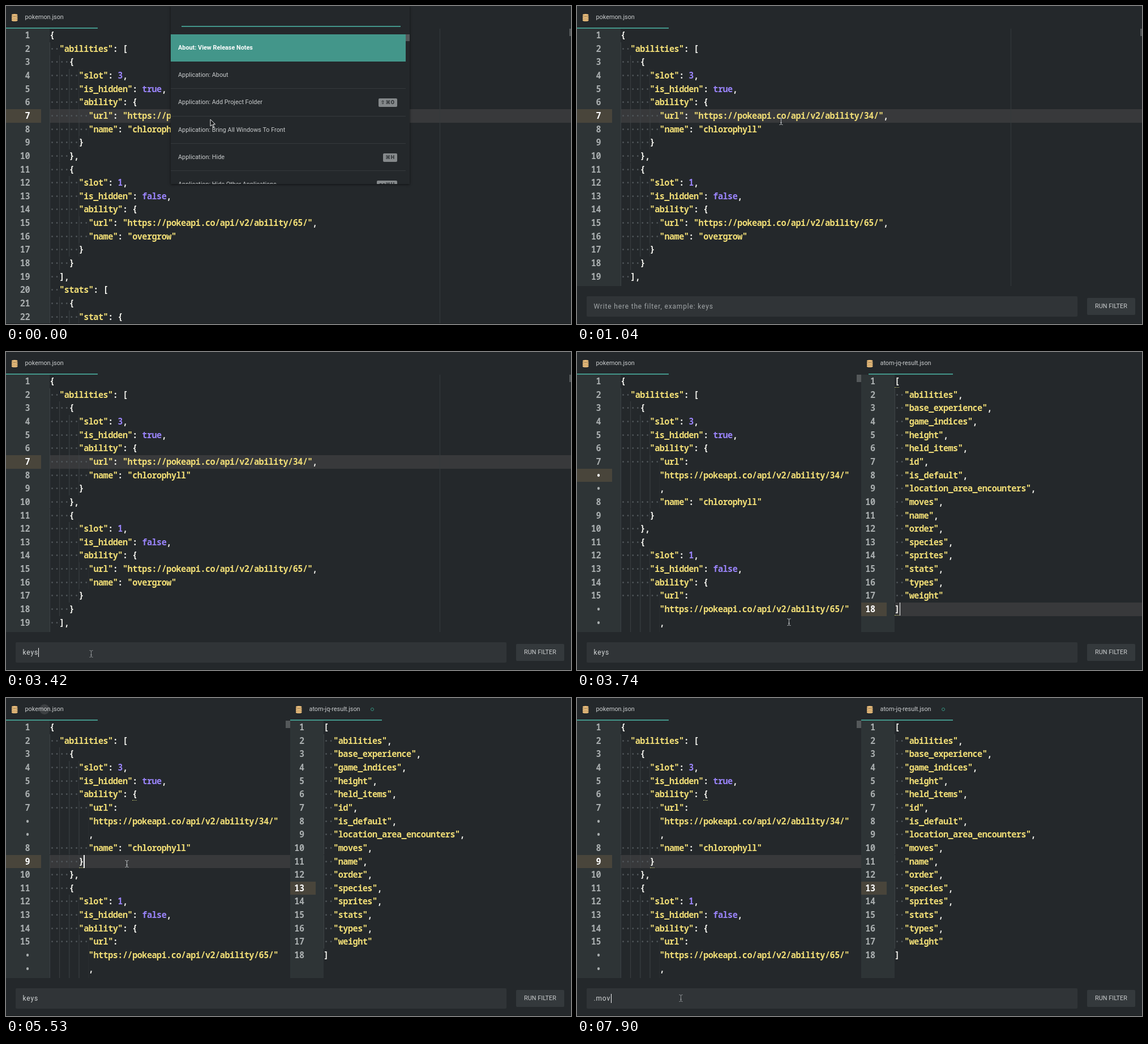
These frames come from a looping animation (998 px wide and 561 px high, 8 s). An HTML page:

```html
<!DOCTYPE html>
<html lang="en">
<head>
<meta charset="utf-8">
<title>JSON filter</title>
<style>
:root { --bg: #24282b; --teal: #43968a; --pitch: 8.6px; --row: 23.65px; }
html, body { margin: 0; width: 100%; height: 100%; overflow: hidden; background: var(--bg); }
#stage { position: relative; width: 998px; height: 561px; overflow: hidden; background: var(--bg);
  font: 10.85px Roboto, sans-serif; color: #c9cccd; }
#stage div, #stage svg { position: absolute; }
[hidden] { display: none !important; }
.pane { top: 0; height: 561px; overflow: hidden; background: var(--bg);
  font: 600 15.2px/var(--row) "Noto Sans Mono", monospace; letter-spacing: -.52px; white-space: pre; }
.gutter { left: 0; top: 40px; height: 521px; background: #2e3436; }
.num { left: 0; text-align: right; color: #a9aeaf; height: var(--row); }
.num.current { color: #fff; }
.line { height: var(--row); color: #f4f4ef; }
.line i { display: inline-block; vertical-align: top; height: var(--row); color: #50565a; font-style: normal;
  background: linear-gradient(90deg, #3d4346 1px, transparent 1px) 0 0 / calc(2 * var(--pitch)) 100%; }
.line b { font-weight: 600; color: #f0dd76; }
.line em { font-style: normal; color: #9a84fb; }
.rowmark { height: var(--row); right: 0; background: #38393b; }
.nummark { height: var(--row); left: 0; background: #49453b; }
.match { height: 0; width: 8px; border-bottom: 1px dotted #b9bd6e; }
.caret { width: 1.4px; height: 23px; background: #f4f4f4; }
.thumb { background: #54585a; }
.tab { top: 0; height: 40px; line-height: 40px; width: 162px; }
.tab .name { left: 33.5px; white-space: nowrap; }
.tab .bar { left: 0; right: 0; top: 38px; height: 1.6px; background: var(--teal); }
#palette { left: 291px; top: 0; width: 422px; height: 314px; overflow: hidden; background: var(--bg);
  box-shadow: 0 1px 4px #0009; }
.item { left: 0; width: 415px; height: 47.2px; line-height: 48px; border-bottom: 1px solid #35393c;
  text-indent: 13px; white-space: nowrap; }
.item.first { background: var(--teal); color: #fff; font-weight: 700; border-color: var(--teal); }
.key { right: 15px; top: 17px; height: 15px; line-height: 15px; padding: 0 4px; border-radius: 2px; text-indent: 0;
  background: #85898b; color: #24282b; font: 700 9px/15px Roboto, "DejaVu Sans", sans-serif; letter-spacing: 1px; }
#panel { left: 0; top: 494px; width: 998px; height: 67px; background: var(--bg); }
#input { left: 17px; top: 18px; width: 867px; height: 36px; border-radius: 2px; background: #303437; }
#text { left: 12.5px; line-height: 36px; font-size: 12px; letter-spacing: .83px; white-space: pre; color: #d3d6d7; }
#text.empty { color: #a0a5a7; }
#run { left: 901px; top: 21px; width: 85px; height: 30px; line-height: 30px; text-align: center;
  border-radius: 2px; background: #34393c; }
</style>
</head>
<body>
<div id="stage"></div>
<script>
const PITCH = 8.6, ROW = 23.65, TOP = 40, LOOP = 8000;
const stage = document.getElementById('stage');

function add(parent, cls, style = {}, html = '') {
  const el = document.createElement('div');
  el.className = cls;
  for (const [k, v] of Object.entries(style)) el.style[k] = typeof v === 'number' ? v + 'px' : v;
  el.innerHTML = html;
  parent.append(el);
  return el;
}
const show = (el, on) => { el.hidden = !on; };
const rowTop = i => TOP + i * ROW;

const ability = (slot, hidden, id, name, end) => `    {
      "slot": ${slot},
      "is_hidden": ${hidden},
      "ability": {
        "url": "https://pokeapi.co/api/v2/ability/${id}/",
        "name": "${name}"
      }
    }${end}`;
const source = `{
  "abilities": [
${ability(3, true, 34, 'chlorophyll', ',')}
${ability(1, false, 65, 'overgrow', '')}
  ],
  "stats": [
    {
      "stat": {`.split('\n');
const keys = ('abilities base_experience game_indices height held_items id is_default location_area_encounters ' +
  'moves name order species sprites stats types weight').split(' ');
const result = ['[', ...keys.map((k, i) => `  "${k}"${i < keys.length - 1 ? ',' : ''}`), ']'];

const numbered = lines => lines.map((text, i) => ({ num: i + 1, text }));
// Soft wrap: long url lines continue on bulleted rows.
const wrapped = lines => numbered(lines).flatMap(row => {
  const m = row.text.match(/^( +)("url":) (".*")(,)$/);
  if (!m) return [row];
  return [{ num: row.num, text: m[1] + m[2] }, ...[m[3], m[4]].map(s => ({ num: '•', text: m[1] + s, soft: true }))];
});

function paint({ text, soft }) {
  const indent = text.search(/\S/);
  const code = text.trim().replace(/"[^"]*"|true|false|\d+/g, s => s[0] === '"' ? `<b>${s}</b>` : `<em>${s}</em>`);
  return `<i style="width:${indent * PITCH}px">${(soft ? ' ' : '·').repeat(indent)}</i>${code}`;
}

function makePane(left, width, gutter, numRight, markWidth, rows) {
  const el = add(stage, 'pane', { left, width });
  add(el, 'gutter', { width: gutter });
  const rowMark = add(el, 'rowmark', { left: gutter + 1 });
  const numMark = add(el, 'nummark', { width: markWidth });
  const nums = rows.map((row, i) => {
    add(el, 'line', { left: gutter, top: rowTop(i) }, paint(row));
    return add(el, 'num', { top: rowTop(i), width: numRight }, row.num);
  });
  const at = (row, col) => ({ left: gutter + col * PITCH, top: rowTop(row) });
  return {
    el,
    select(row, active) {
      rowMark.style.top = numMark.style.top = rowTop(row) + 'px';
      show(rowMark, active);
      nums.forEach((n, i) => n.classList.toggle('current', i === row));
    },
    caret: (row, col) => add(el, 'caret', at(row, col)),
    match(row, col) {
      const { left, top } = at(row, col);
      return add(el, 'match', { left, top: top + 22 });
    }
  };
}

const wide = makePane(0, 998, 77, 42, 62, numbered(source));
add(wide.el, '', { left: 766, top: 40, width: 1, height: 521, background: '#34393c' });
add(wide.el, 'thumb', { left: 995, top: 40, width: 3, height: 13 });
wide.select(6, true);
const wideCaret = wide.caret(6, 33);

const left = makePane(0, 502, 77, 42, 62, wrapped(source).slice(0, 20));
add(left.el, 'thumb', { left: 494, top: 40, width: 8, height: 13 });
const leftCaret = left.caret(10, 7);
const leftMatches = [left.match(5, 17), left.match(10, 6)];

const right = makePane(502, 496, 59, 24.5, 45, numbered(result));
const endCaret = right.caret(17, 1), clickCaret = right.caret(12, 9);
const rightMatches = [right.match(0, 0), right.match(17, 0)];

const disc = y => `<path d="M0 ${y}v2.2c0 2.3 10.4 2.3 10.4 0v-2.2c-1 1.6-9.4 1.6-10.4 0z"/>`;
const icon = `<svg width="11" height="13" style="left:10px;top:13.5px" fill="#efc07c">
  <ellipse cx="5.2" cy="1.9" rx="5.2" ry="1.9"/>${disc(3.2)}${disc(6.2)}${disc(9.2)}</svg>`;
const makeTab = (x, name) => add(stage, 'tab', { left: x },
  `${icon}<div class="name">${name}</div><div class="bar"></div>`);
const mainTab = makeTab(0, 'pokemon.json');
const resultTab = makeTab(502, 'atom-jq-result.json');
const resultBar = resultTab.querySelector('.bar');
const ripple = add(mainTab, '', { left: 59, top: 11, width: 18, height: 18, borderRadius: '50%', background: '#ffffff1c' });
const dot = add(resultTab, '', { left: 142, top: 16.5, width: 4, height: 4, borderRadius: '50%', border: '1.5px solid #36917f' });

const panel = add(stage, '');
panel.id = 'panel';
panel.innerHTML = '<div id="input"><div id="text"></div></div><div id="run">RUN FILTER</div>';
const field = document.getElementById('text');
const fieldCaret = add(panel, 'caret', { top: 27.5, height: 16 });

const palette = add(stage, '');
palette.id = 'palette';
add(palette, '', { left: 19, top: 35, width: 387, height: 1.5, background: 'var(--teal)' });
add(palette, 'thumb', { left: 415, top: 50, width: 7, height: 12 });
[['About: View Release Notes'], ['Application: About'], ['Application: Add Project Folder', '⇧⌘O'],
 ['Application: Bring All Windows To Front'], ['Application: Hide', '⌘H'],
 ['Application: Hide Other Applications', '⌥⌘H']].forEach(([label, key], i) =>
  add(palette, i ? 'item' : 'item first', { top: 50 + i * 48.2 }, label + (key ? `<div class="key">${key}</div>` : '')));

add(stage, '', { left: 0, top: 560, width: 998, height: 1, background: '#1b1e20' });

const arrow = add(stage, '', { left: 360, top: 199 }, `<svg width="11" height="17"><path
  d="M1 1v12l2.8-2.6 2 4.6 1.9-.8-2-4.5h3.8z" fill="#17191b" stroke="#eee" stroke-width="1"/></svg>`);
const beam = add(stage, '', {}, `<svg width="9" height="15" style="left:-4.5px;top:-7.5px"><path
  d="M1.5 1.5q3 0 3 2v8q0 2-3 2M7.5 1.5q-3 0-3 2v8q0 2 3 2M3 9.5h3" fill="none" stroke="#b9bdbf"/></svg>`);

// [time, x, y]
const beamPath = [[0, 360, 203], [1190, 345, 225], [1340, 300, 300], [1490, 235, 395], [1640, 175, 480],
  [1780, 135, 525], [1930, 119, 538], [3420, 150, 532], [3590, 260, 510], [3740, 374, 476], [3880, 480, 435],
  [4040, 580, 385], [4200, 640, 347], [5240, 470, 325], [5380, 213, 292], [5680, 212, 310], [5830, 205, 400],
  [5980, 190, 490], [6120, 183, 529]];
// [time, text]
const typing = [[0, ''], [2520, 'k'], [2670, 'key'], [2820, 'keys'], [6720, ''], [7470, '.'], [7610, '.m'],
  [7760, '.mo'], [7900, '.mov']];
const latest = (list, t) => list.findLast(entry => entry[0] <= t);
const OPEN = 290, SPLIT = 3590, CLICK = 4490, BACK = 5530;

function render(t) {
  const within = (a, b) => t >= a && t < b;
  const split = t >= SPLIT;
  show(palette, t < OPEN);
  show(arrow, t < OPEN);
  show(beam, t >= OPEN);
  show(panel, t >= OPEN);
  show(wide.el, !split);
  show(wideCaret, within(OPEN, 1040));
  [left.el, right.el, resultTab].forEach(el => show(el, split));

  left.select(t < BACK ? 7 : 10, t >= BACK);
  right.select(t < CLICK ? 17 : 12, t < BACK);
  show(leftCaret, within(BACK, 6120));
  leftMatches.forEach(el => show(el, t >= BACK));
  show(endCaret, t < CLICK);
  rightMatches.forEach(el => show(el, t < CLICK));
  show(clickCaret, within(CLICK, 4940));
  show(ripple, within(BACK, 5680));
  show(dot, t >= 3880);
  resultBar.style.left = t < 3880 ? '13px' : '0';

  const text = latest(typing, t)[1];
  field.textContent = text || 'Write here the filter, example: keys';
  field.classList.toggle('empty', !text);
  show(fieldCaret, within(1930, SPLIT) || within(6120, 7170) || t >= 7470);
  fieldCaret.style.left = (text ? 29.5 + field.offsetWidth : 29) + 'px';

  const [, x, y] = latest(beamPath, t);
  beam.style.left = x + 'px';
  beam.style.top = y + 'px';
  beam.style.opacity = y > 494 ? .7 : 1;
}

const start = performance.now();
function tick() {
  render((performance.now() - start) % LOOP);
  requestAnimationFrame(tick);
}
tick();
</script>
</body>
</html>
```
